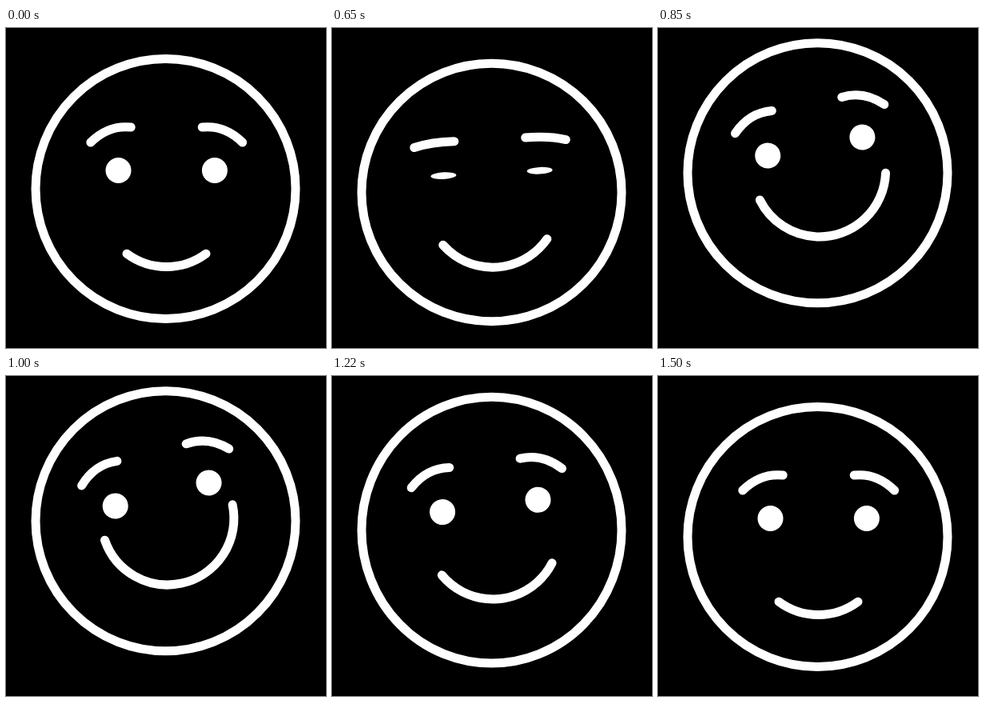
An HTML page with a canvas that plays this animation: 400 px wide and 400 px high, repeating every 2020 ms.

```html
<!DOCTYPE html>
<html lang="en">
<head>
<meta charset="utf-8">
<title>Smiling face</title>
<style>
  html, body { margin: 0; width: 100%; height: 100%; overflow: hidden; background: #000; }
  canvas { display: block; }
</style>
</head>
<body>
<canvas id="stage" width="400" height="400"></canvas>
<script>
const ctx = document.getElementById('stage').getContext('2d');
const LOOP = 2020, STEP = 25;
const rad = Math.PI / 180;

const progress = (t, from, to) => Math.min(1, Math.max(0, (t - from) / (to - from)));
const smooth = (t, from, to) => {
  const x = progress(t, from, to);
  return x * x * (3 - 2 * x);
};
// Rises smoothly to 1, then falls back with growing speed
const hop = (t, from, top, power) => smooth(t, from, top) - progress(t, 1000, 1325) ** power;
const pulse = (t, from, peak, to) => smooth(t, from, peak) - smooth(t, peak, to);

function drawHead(t) {
  const jump = hop(t, 550, 800, 1.5);
  const squash = pulse(t, 500, 605, 770) + pulse(t, 1295, 1395, 1500);
  const radius = 162.5 - 6 * squash + 16 * jump * (1 - jump);
  ctx.beginPath();
  ctx.ellipse(199.5, 201 - 19.7 * jump + 14 * squash, 162.5, radius, 0, 0, 2 * Math.PI);
  ctx.stroke();
}

function drawMouth(lean, lift, blink, grin) {
  const left = 36.6 + 6 * blink + 34.3 * grin;
  const right = 36.6 + 6 * blink + 65.3 * grin;
  const y = 215.5 - 37.5 * lift + 15 * blink;
  ctx.beginPath();
  ctx.arc(200.5 + 1.4 * lean, y, 83, (90 - right) * rad, (90 + left) * rad);
  ctx.stroke();
}

function drawEyeAndBrow(side, open) {
  const browY = y => -37.7 - 6.8 * open + (y + 44.5) * open;
  ctx.beginPath();
  ctx.ellipse(side * 60.2, 0, 16, 16 * open, 0, 0, 2 * Math.PI);
  ctx.fill();
  ctx.beginPath();
  ctx.moveTo(side * 44.5, browY(-54));
  ctx.quadraticCurveTo(side * 73, browY(-57), side * 94.9, browY(-35));
  ctx.stroke();
}

function drawEyes(lean, lift, blink) {
  ctx.save();
  ctx.translate(200.7 - 5.6 * lean, 178 - 30 * lift + 16 * blink);
  ctx.rotate(-14 * lean * rad);
  for (const side of [-1, 1]) drawEyeAndBrow(side, 1 - blink);
  ctx.restore();
}

function draw(t) {
  const lean = hop(t, 500, 1000, 2);
  const lift = hop(t, 550, 840, 2);
  const grin = hop(t, 500, 1000, 1.4);
  const blink = 0.85 * (pulse(t, 525, 605, 795) + pulse(t, 1255, 1395, 1500));

  ctx.fillStyle = '#000';
  ctx.fillRect(0, 0, 400, 400);
  ctx.fillStyle = ctx.strokeStyle = '#fff';
  ctx.lineWidth = 11;
  ctx.lineCap = 'round';
  drawHead(t);
  drawMouth(lean, lift, blink, grin);
  drawEyes(lean, lift, blink);
}

const start = performance.now();
function tick() {
  const t = (performance.now() - start) % LOOP;
  draw(Math.floor((t + 5) / STEP) * STEP);
  requestAnimationFrame(tick);
}
tick();
</script>
</body>
</html>
```
